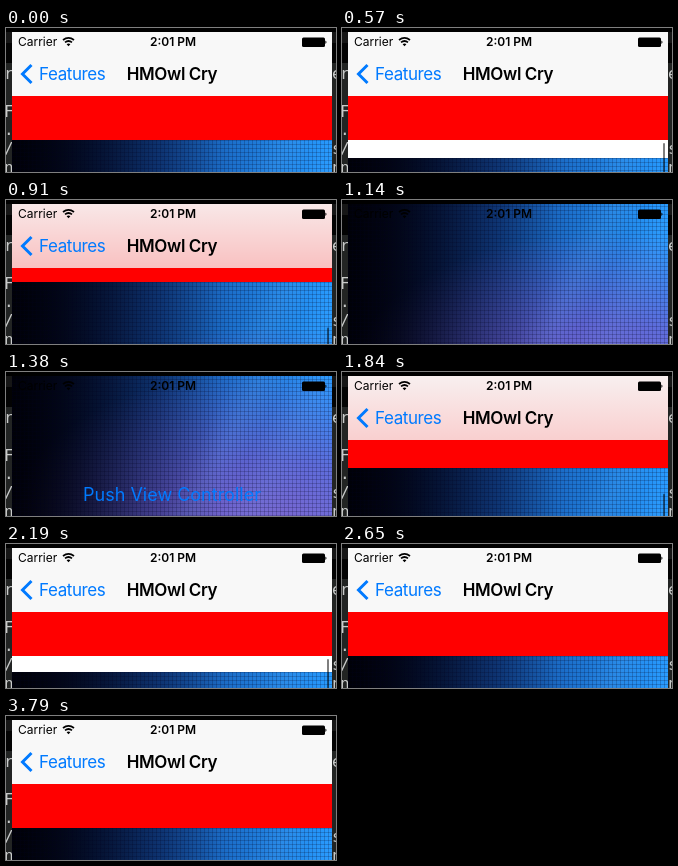
Write an HTML page that moves like this. It is 330 px wide and 144 px high and loops after 3890 ms.

```html
<!DOCTYPE html>
<html lang="en">
<head>
<meta charset="utf-8">
<title>Shy navigation bar</title>
<style>
  html, body { margin: 0; width: 100%; height: 100%; overflow: hidden; background: #000; }
  div, span { position: absolute; white-space: pre; }
  svg { position: absolute; left: 0; top: 0; overflow: visible; }
  #stage {
    left: 0; top: 0; width: 330px; height: 144px; overflow: hidden;
    background: linear-gradient(#000 4px, #161616 4px 15px, #030303 15px 35px, #222423 35px);
    font-family: Inter, "Liberation Sans", sans-serif;
  }
  .code { font: 16px/18px "DejaVu Sans Mono", monospace; color: #c9cbca; }
  #phone { left: 6px; top: 4px; width: 320px; height: 140px; overflow: hidden; background: #fff; }
  #page { left: 0; top: 0; width: 320px; height: 300px; background: #000; }
  #photo {
    inset: 0;
    background:
      repeating-linear-gradient(90deg, rgba(0,0,30,.2) 0 1px, transparent 1px 4px),
      repeating-linear-gradient(rgba(0,0,30,.2) 0 1px, transparent 1px 4px),
      linear-gradient(90deg, rgba(0,0,6,.9) 0, rgba(0,0,10,.72) 50px, rgba(0,0,16,.3) 130px, transparent 210px),
      linear-gradient(118deg, transparent 52%, rgba(120,190,255,.1) 58%, transparent 64%, rgba(120,190,255,.08) 71%, transparent 78%),
      radial-gradient(270px 170px at 260px 215px, rgba(140,100,205,.9), rgba(120,90,205,.7) 45%, transparent),
      linear-gradient(90deg, #020414 0, #0a2458 80px, #124490 150px, #1c70cc 220px, #269aff 320px);
  }
  #push { left: 0; width: 320px; top: 161px; text-align: center; font-size: 18px; line-height: 22px; color: #007aff; }
  #ext { left: 0; top: 0; width: 320px; height: 44px; background: #f00; }
  #bar { left: 0; top: 0; width: 320px; height: 64px; background: #f8f8f8; overflow: hidden; }
  #tint, #items { inset: 0; }
  #items { font-size: 17px; line-height: 22px; letter-spacing: -.4px; }
  #back { left: 27px; top: 31px; color: #007aff; }
  #title { left: 0; top: 31px; width: 320px; text-align: center; font-weight: 600; color: #000; }
  #thumb { left: 315px; top: 111px; width: 2px; height: 90px; border-radius: 1px; background: rgba(0,0,0,.5); }
  .status { font-size: 12px; line-height: 16px; top: 2px; color: #000; }
  #clock { left: 1px; width: 320px; text-align: center; font-weight: 600; }
</style>
</head>
<body>
<div id="stage">
  <div id="phone">
    <div id="page">
      <div id="photo"></div>
      <div id="push">Push View Controller</div>
    </div>
    <div id="ext"></div>
    <div id="thumb"></div>
    <div id="bar">
      <div id="tint"></div>
      <div id="items">
        <svg width="30" height="64"><path d="M19.5 33 L10.5 42 L19.5 51" fill="none" stroke="#007aff" stroke-width="3"/></svg>
        <span id="back">Features</span>
        <div id="title">HMOwl Cry</div>
      </div>
    </div>
    <span class="status" style="left:6px">Carrier</span>
    <div class="status" id="clock">2:01 PM</div>
    <svg width="320" height="20">
      <g fill="none" stroke="#000" stroke-width="1.7">
        <path d="M51 8 Q56.5 3.6 62 8"/>
        <path d="M53 10.4 Q56.5 7.6 60 10.4"/>
      </g>
      <path d="M54.6 12.2 Q56.5 10.7 58.4 12.2 L56.5 14.2Z"/>
      <rect x="290" y="5.5" width="23" height="9.5" rx="1.5"/>
      <path d="M313.4 8.5 Q315.6 10.2 313.4 12Z"/>
    </svg>
  </div>
</div>
<script>
const $ = id => document.getElementById(id);
const LOOP = 3890, REST = 112, PULL = 130, PEAK = -50;
const EXT = 44, BAR = 64, FIRST = 910, STEP = 58;

const clamp = (v, lo, hi) => Math.min(hi, Math.max(lo, v));
const easeOut = p => 1 - (1 - p) ** 2.2;
const easeInOut = p => p < .5 ? 4 * p ** 3 : 1 - 4 * (1 - p) ** 3;

// Drags of the page: start, end, from, to, easing
const drags = [
  [330, 570, REST, PULL, easeOut],
  [570, 860, PULL, REST, easeInOut],
  [860, 1430, REST, PEAK, easeOut],
  [1430, 2005, PEAK, REST, easeInOut],
  [2030, 2270, REST, PULL, easeOut],
  [2270, 2590, PULL, REST, easeOut]
];

// Fragments of the editor window behind the phone
function addCode(x, lines) {
  const el = document.createElement('div');
  el.className = 'code';
  el.textContent = lines.join('\n');
  el.style.cssText = `left:${x}px;top:37px;line-height:18.8px`;
  $('stage').prepend(el);
}
addCode(-2, ['r', '', 'F', '.', '/', 'n']);
addCode(326, ['e', '', '', '', 's', 'n']);

function pageTop(t) {
  const now = FIRST + STEP * Math.floor((t - FIRST + STEP / 10) / STEP);
  let top = REST;
  for (const [start, end, from, to, ease] of drags) {
    if (now >= start) top = from + (to - from) * ease(clamp((now - start) / (end - start), 0, 1));
  }
  return Math.round(top);
}

const move = (id, y) => { $(id).style.transform = `translateY(${y}px)`; };

function draw(t) {
  const top = pageTop(t);
  const offset = Math.max(0, REST - top);
  const tucked = Math.min(offset, EXT);
  const lifted = clamp(offset - EXT, 0, BAR);
  const k = tucked / EXT;

  move('page', top - 4);
  move('ext', BAR - tucked - lifted);
  move('bar', -lifted);
  $('items').style.opacity = clamp(1 - lifted / EXT, 0, 1);
  $('tint').style.background =
    `linear-gradient(rgba(255,0,0,${.1 * k}), rgba(255,0,0,${.27 * Math.sqrt(k)}))`;

  move('thumb', .42 * offset);
  $('thumb').style.visibility = t >= 350 && t < 2650 ? 'visible' : 'hidden';
}

const start = performance.now();
function tick() {
  draw((performance.now() - start) % LOOP);
  requestAnimationFrame(tick);
}
tick();
</script>
</body>
</html>
```
